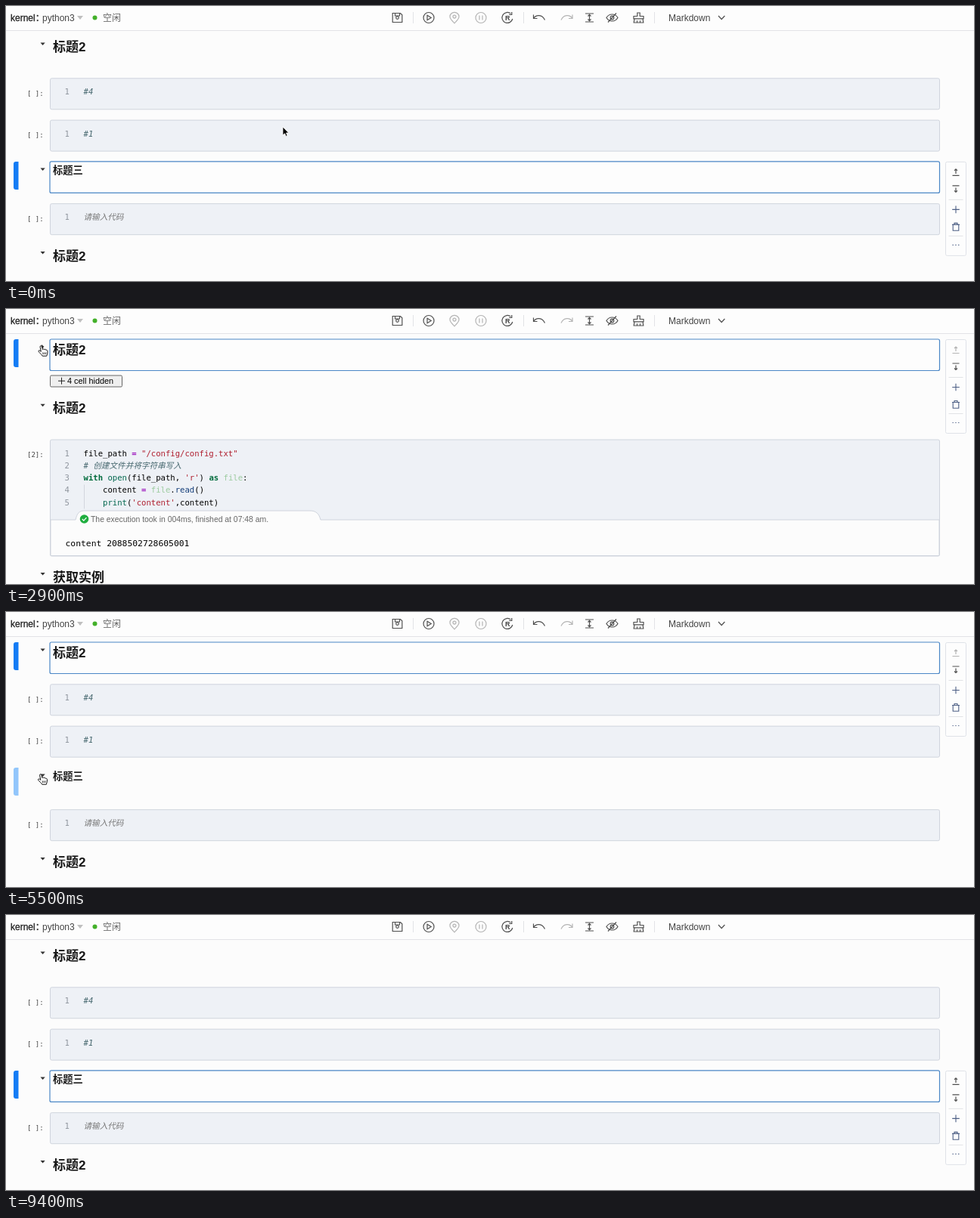
Write an HTML page that moves like this. It is 1280 px wide and 364 px high and loops after 9500 ms.

```html
<!DOCTYPE html>
<html lang="zh">
<head>
<meta charset="utf-8">
<style>
  html, body { margin: 0; width: 100%; height: 100%; overflow: hidden; background: #fcfcfc; }
  svg { display: block; width: 1280px; height: 364px; }
  text { white-space: pre; font: 12px "Liberation Sans", "Noto Sans CJK SC", "Noto Sans CJK", sans-serif; fill: #444; }
  .mono { font: 10.6px "DejaVu Sans Mono", "Noto Sans CJK SC", "Noto Sans CJK", monospace; fill: #000; }
  .prompt { font-size: 9px; fill: #444; }
  .num { fill: #8f959e; }
  .out { font-size: 11.35px; }
  .note { font-style: italic; fill: #47686f; }
  .hint { font-style: italic; fill: #777; }
  .head { font-weight: bold; fill: #181818; }
  .kw { fill: #006b3c; font-weight: bold; }
  .fn { fill: #00664d; }
  .op { fill: #a020c0; font-weight: bold; }
  .str { fill: #b02030; }
  .mod { fill: #9ccb9f; }
  .prop { fill: #123c78; }
  .icon { fill: none; stroke: #505050; stroke-width: 1.2; }
  .dim { stroke: #b4b4b4; }
  .side { stroke: #4d5f85; stroke-width: 1.1; }
  .rule { stroke: #e2e3e6; fill: none; }
  .code { fill: #eef1f6; stroke: #cfd4dd; }
</style>
</head>
<body>
<svg viewBox="0 0 1280 364">
  <g id="cells"></g>
  <g id="toolbar"></g>
  <g id="arrow"><path d="M0 0V11L2.6 8.8L4.3 12.4L6.1 11.6L4.5 8H7.8Z" stroke="#fff" stroke-width=".8"/></g>
  <g id="hand" stroke="#111" stroke-width="1" stroke-linejoin="round">
    <path fill="#fff" d="M-.9 1.2C-1.2-.6 1-1 1.4.8L2.3 4.6C3 3.5 4.4 3.8 4.6 4.8C5.4 3.9 6.8 4.4 6.9 5.4C7.8 4.9 8.8 5.5 8.9 6.6V9.2C8.8 11 8 11.5 7.8 13.2H2.2C1.5 11.5-1.6 9.2-3 7.2C-3.4 6-2 5.5-1 6.3L.3 7.4Z"/>
    <path d="M2.7 8.4L3 11M4.7 8.4V11M6.7 8.4L6.5 11" stroke-width=".8"/>
  </g>
</svg>
<script>
const LOOP = 9500;
const $ = id => document.getElementById(id);
const text = (x, y, body, cls = '', extra = '') => `<text x="${x}" y="${y}" class="${cls}" ${extra}>${body}</text>`;
const path = (d, cls = 'icon', extra = '') => `<path d="${d}" class="${cls}" ${extra}/>`;
const box = (x, y, w, h, attrs) => `<rect x="${x}" y="${y}" width="${w}" height="${h}" ${attrs}/>`;
const at = (x, y, body) => `<g transform="translate(${x} ${y})">${body}</g>`;
const span = (cls, body) => `<tspan class="${cls}">${body}</tspan>`;
const ring = (r, cls = 'icon') => `<circle r="${r}" class="${cls}"/>`;

function toolbar() {
  const undo = 'M-7.5-3.5V1.5H-2.5M-7.5 1.5C-4-4 4-4 7.5 3.5';
  return box(0, 0, 1280, 32, 'fill="#fdfdfd"') + path('M0 32.5H1280', 'rule') +
    [538.5, 684.5, 857.5].map(x => path(`M${x} 8V23`, 'rule')).join('') +
    text(6, 19.5, 'kernel：', '', 'style="fill:#222;stroke:#222;stroke-width:.3px"') +
    text(48, 19.5, 'python3') + path('M94 13H102L98 18Z', '', 'fill="#bfbfbf"') +
    '<circle cx="117.5" cy="15.5" r="3" fill="#43b02a"/>' + text(128, 19.5, '空闲', '', 'style="fill:#666"') +
    at(517.5, 15.5, path('M-6.3-6H4L6.3-3.7V6H-6.3ZM-3-6V-2.5H3V-6') + ring(1.8)) +
    at(559, 15.5, ring(7) + path('M-2-3.2L3.2 0L-2 3.2Z')) +
    at(593, 15.5, path('M0 7.2C-3 4.3-6 1.8-6-1.4A6 5.8 0 0 1 6-1.4C6 1.8 3 4.3 0 7.2Z', 'icon dim') +
      `<circle cy="-1.4" r="2" class="icon dim"/>`) +
    at(628, 15.5, ring(7, 'icon dim') + path('M-2-3V3M2-3V3', 'icon dim')) +
    at(663, 15.5, path('M4.5-5.4A7 7 0 1 0 6.8 1.5M5.8-7.5V-4H2.2') +
      text(-3, 3.6, 'R', '', 'style="font-size:9px;font-weight:bold"')) +
    at(705, 15, path(undo, 'icon', 'stroke-width="1.5"')) +
    at(741.5, 15, `<g transform="scale(-1 1)">${path(undo, 'icon dim')}</g>`) +
    at(771.5, 15.5, path('M-5.5-5.5H5.5M-5.5 5.5H5.5M0-4V4M-2-2L0-4.2L2-2M-2 2L0 4.2L2 2')) +
    at(801.5, 15.5, path('M-7.5 0C-4-6 4-6 7.5 0C4 6-4 6-7.5 0ZM-5.5 6L5.5-6') + ring(2.3)) +
    at(836.5, 15.5, path('M-1.7-2V-6.5H1.7V-2H6.5V1.3H-6.5V-2ZM-5.5 1.3L-6.3 6.5H6.3L5.5 1.3M-2 6.5V3.8M2 6.5V3.8')) +
    text(876, 19.5, 'Markdown') + path('M942 13L946.2 17.5L950.4 13');
}

function sidebar(y, first) {
  const up = 'M-4.5 4.5H4.5M0 2V-4M-2-2L0-4L2-2';
  return at(1256, y, box(-13.5, .5, 27, 124, 'rx="2" fill="#fdfdfd" stroke="#dfe2e8"') +
    at(0, 14, path(up, first ? 'icon dim' : 'icon')) +
    at(0, 36.5, `<g transform="scale(1 -1)">${path(up)}</g>`) +
    path('M-9.5 50.5H9.5M-9.5 98.5H9.5', 'rule') +
    path('M-4.8 63.5H4.8M0 58.7V68.3', 'icon side') +
    at(0, 86.5, path('M-5-3H5M-2-3V-5H2V-3M-3.8-3V4.8H3.8V-3', 'icon side')) +
    path('M-4.5 110.5H4.5', 'icon side', 'stroke-dasharray="1.3 2.5"'));
}

function heading(y, cell, state) {
  const selected = cell.id === state.selected, hovered = cell.id === state.hover;
  const small = cell.size < 15;
  let out = '';
  if (selected || hovered)
    out += path(`M16.5 ${y}H13Q10 ${y} 10 ${y + 3}V${y + 34}Q10 ${y + 37} 13 ${y + 37}H16.5Z`, '', `fill="${selected ? '#147cf5' : '#92c6fb'}"`);
  if (selected)
    out += box(58, y, 1176.5, 41.5, 'rx="2" fill="#fdfdfd" stroke="#4b87c6" stroke-width="1.2"') + sidebar(y, cell.id === 'top');
  out += path(cell.id === state.folded ? `M47 ${y + 7}V${y + 13}L50.5 ${y + 10}Z` : `M45.5 ${y + 8.5}H51.7L48.6 ${y + 12}Z`, '', 'fill="#333"');
  out += text(62, y + (small ? 16 : 20), cell.title, 'head', `style="font-size:${cell.size}px"`);
  if (cell.id === state.folded) {
    out += box(58.5, y + 48, 95, 15, 'rx="1.5" fill="#efefef" stroke="#666"') +
      path(`M69 ${y + 55.2}H78M73.5 ${y + 50.7}V${y + 59.7}`, '', 'stroke="#222"') +
      text(81, y + 59.2, `${cell.hides} cell hidden`, '', 'style="font-size:10.9px;fill:#000"');
  }
  return out;
}

function shortCode(y, cell) {
  return box(58.5, y + .5, 1176, 41, 'rx="2" class="code"') + text(28, y + 23.5, '[ ]:', 'mono prompt') +
    text(77.5, y + 22, '1', 'mono num') + text(102.5, y + 22, cell.code, 'mono ' + cell.cls);
}

function ranCode(y) {
  const lines = [
    `file_path ${span('op', '=')} ${span('str', '"/config/config.txt"')}`,
    span('note', '# 创建文件并将字符串写入'),
    `${span('kw', 'with')} ${span('fn', 'open')}(file_path, ${span('str', "'r'")}) ${span('kw', 'as')} ${span('mod', 'file')}:`,
    `    content ${span('op', '=')} ${span('mod', 'file')}.${span('prop', 'read')}()`,
    `    ${span('fn', 'print')}(${span('str', "'content'")},content)`
  ];
  return at(0, y, box(58.5, .5, 1176, 154, 'rx="2" class="code"') +
    path('M59 106.5H92C94 97.5 97 94.5 104 94.5H402C410 94.5 414 98.5 416 106.5H1234V154H59Z', '', 'fill="#fcfcfc" stroke="#cfd4dd"') +
    path('M103.5 60V92', '', 'stroke="#d2d6de"') + text(28, 23.5, '[2]:', 'mono prompt') +
    lines.map((line, i) => text(77.5, 22 + 16.25 * i, i + 1, 'mono num') + text(102.5, 22 + 16.25 * i, line, 'mono')).join('') +
    '<circle cx="103.5" cy="105.5" r="5.8" fill="#1fae3f"/>' + path('M100.8 105.5L102.8 107.6L106.4 103.6', 'icon', 'style="stroke:#fff"') +
    text(112, 109, 'The execution took in 004ms, finished at 07:48 am.', '', 'style="font-size:10.4px;fill:#666"') +
    text(78.5, 141.5, 'content 2088502728605001', 'mono out'));
}

const CELLS = [
  { id: 'top', title: '标题2', size: 17, hides: 4 },
  { code: '#4', cls: 'note' },
  { code: '#1', cls: 'note' },
  { id: 'mid', title: '标题三', size: 13.3, hides: 1 },
  { code: '请输入代码', cls: 'hint' },
  { id: 'next', title: '标题2', size: 17 },
  { ran: true },
  { id: 'last', title: '获取实例', size: 17 }
];

function notebook(state, pointer) {
  let y = 40, skip = 0;
  const placed = [];
  for (const cell of CELLS) {
    if (skip) { skip--; continue; }
    placed.push([cell, y]);
    if (cell.title && pointer.y >= y && pointer.y < y + 37 && pointer.x < 1240) state.hover = cell.id;
    const folded = cell.id && cell.id === state.folded;
    if (folded) skip = cell.hides;
    y += cell.ran ? 168 : folded ? 77.2 : 55.3;
  }
  return placed.map(([cell, top]) =>
    cell.title ? heading(top, cell, state) : cell.ran ? ranCode(top) : shortCode(top, cell)).join('');
}

// Pointer stops: time, x, y
const STOPS = [
  [0, 366, 160], [100, 366, 160], [1700, 46, 49], [3000, 46, 49], [3600, 88, 97], [4400, 88, 97],
  [5300, 45.5, 215], [5900, 45.5, 215], [6700, 96, 258], [7700, 96, 258], [8300, 120, 374], [LOOP, 120, 374]
];

function pointerAt(t) {
  const i = STOPS.findIndex((stop, k) => k && t <= stop[0]);
  const [t0, x0, y0] = STOPS[i - 1], [t1, x1, y1] = STOPS[i];
  const p = (t - t0) / (t1 - t0), e = p * p * (3 - 2 * p);
  return { x: x0 + (x1 - x0) * e, y: y0 + (y1 - y0) * e };
}

const within = (t, from, to) => t >= from && t < to;
let shown = '';

function draw(now) {
  const t = Math.floor(now % LOOP / 100) * 100;
  const pointer = pointerAt(t);
  const markup = notebook({
    selected: within(t, 2000, 5700) ? 'top' : 'mid',
    folded: within(t, 2100, 4300) ? 'top' : within(t, 5800, 7500) ? 'mid' : null
  }, pointer);
  if (markup !== shown) $('cells').innerHTML = shown = markup;

  const hand = pointer.x < 53 || t >= 7500;
  for (const id of ['arrow', 'hand']) {
    $(id).setAttribute('transform', `translate(${pointer.x} ${pointer.y})`);
    $(id).style.display = (id === 'hand') === hand ? '' : 'none';
  }
}

$('toolbar').innerHTML = toolbar();
const start = performance.now();
function tick() {
  draw(performance.now() - start);
  requestAnimationFrame(tick);
}
tick();
</script>
</body>
</html>
```
